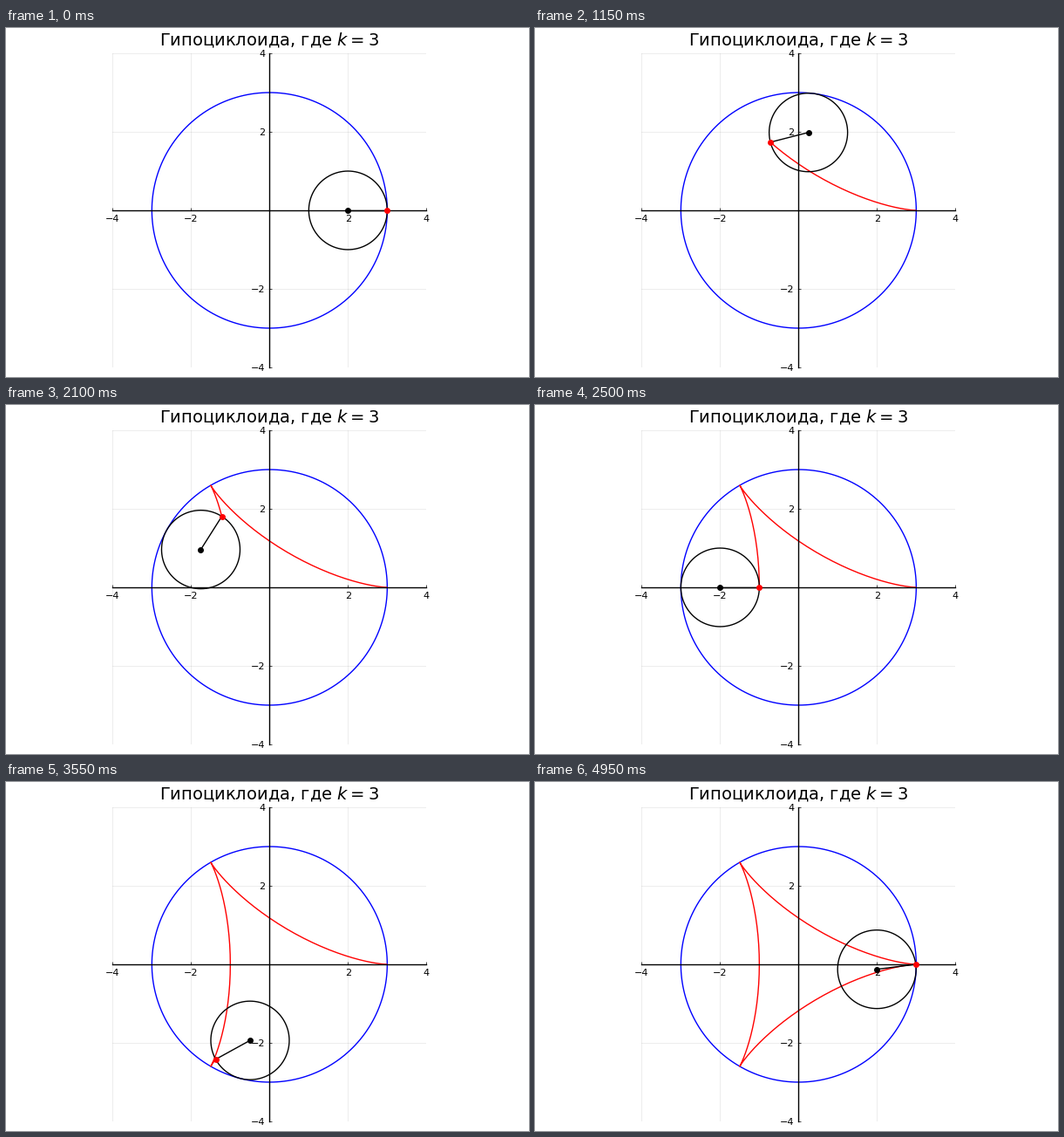
Recreate the animation shown at these times as a matplotlib script. Size 600 px wide and 400 px high, loop 5000 ms.

```python
import numpy as np
import matplotlib.pyplot as plt
from matplotlib.animation import FuncAnimation

K = 3            # ratio of the fixed radius to the rolling radius
FRAMES = 100
INTERVAL = 50    # ms
W, H, DPI = 600, 400, 100
CX, CY, HALF = 302.35, 209.0, 180  # plot centre and half side, in pixels

plt.rcParams["font.family"] = "DejaVu Sans"
plt.rcParams["mathtext.fontset"] = "dejavusans"


def circle(x, y, r):
    a = np.linspace(0, 2 * np.pi, 201)
    return x + r * np.cos(a), y + r * np.sin(a)


def centre(t):
    return (K - 1) * np.cos(t), (K - 1) * np.sin(t)


def pen(t):
    x, y = centre(t)
    return x + np.cos((K - 1) * t), y - np.sin((K - 1) * t)


fig = plt.figure(figsize=(W / DPI, H / DPI), dpi=DPI, facecolor="white")
ax = fig.add_axes([(CX - HALF) / W, (H - CY - HALF) / H,
                   2 * HALF / W, 2 * HALF / H])
ax.set(xlim=(-4, 4), ylim=(-4, 4),
       xticks=[-4, -2, 2, 4], yticks=[-4, -2, 2, 4])
ax.set_title(f"Гипоциклоида, где $k = {K}$", fontsize=14, pad=6)
ax.set_axisbelow(True)
ax.grid(color="black", alpha=0.1, linewidth=0.5)
ax.tick_params(direction="in", width=0.5, length=2.5, pad=3.5, labelsize=8)
for side in ("left", "bottom"):
    ax.spines[side].set_position("zero")
    ax.spines[side].set_linewidth(1)
for side in ("right", "top"):
    ax.spines[side].set_visible(False)


def line(color, z):
    return ax.plot([], [], color=color, lw=1, zorder=z,
                   solid_capstyle="butt")[0]


def dot(color, z):
    return ax.scatter([0], [0], s=16, c=color, edgecolors=color,
                      linewidths=1, zorder=z)


line("blue", 1).set_data(*circle(0, 0, K))
trail = line("red", 2)
wheel = line("black", 3)
arm = line("black", 4)
hub = dot("black", 5)
tip = dot("red", 6)


def update(i):
    ts = 2 * np.pi * np.arange(i + 1) / FRAMES
    t = ts[-1]
    (x, y), (px, py) = centre(t), pen(t)
    trail.set_data(*pen(ts))
    wheel.set_data(*circle(x, y, 1))
    arm.set_data([x, px], [y, py])
    hub.set_offsets([[x, y]])
    tip.set_offsets([[px, py]])
    return trail, wheel, arm, hub, tip


anim = FuncAnimation(fig, update, frames=FRAMES, interval=INTERVAL,
                     init_func=lambda: update(0), repeat=True, blit=False)
plt.show()
```
